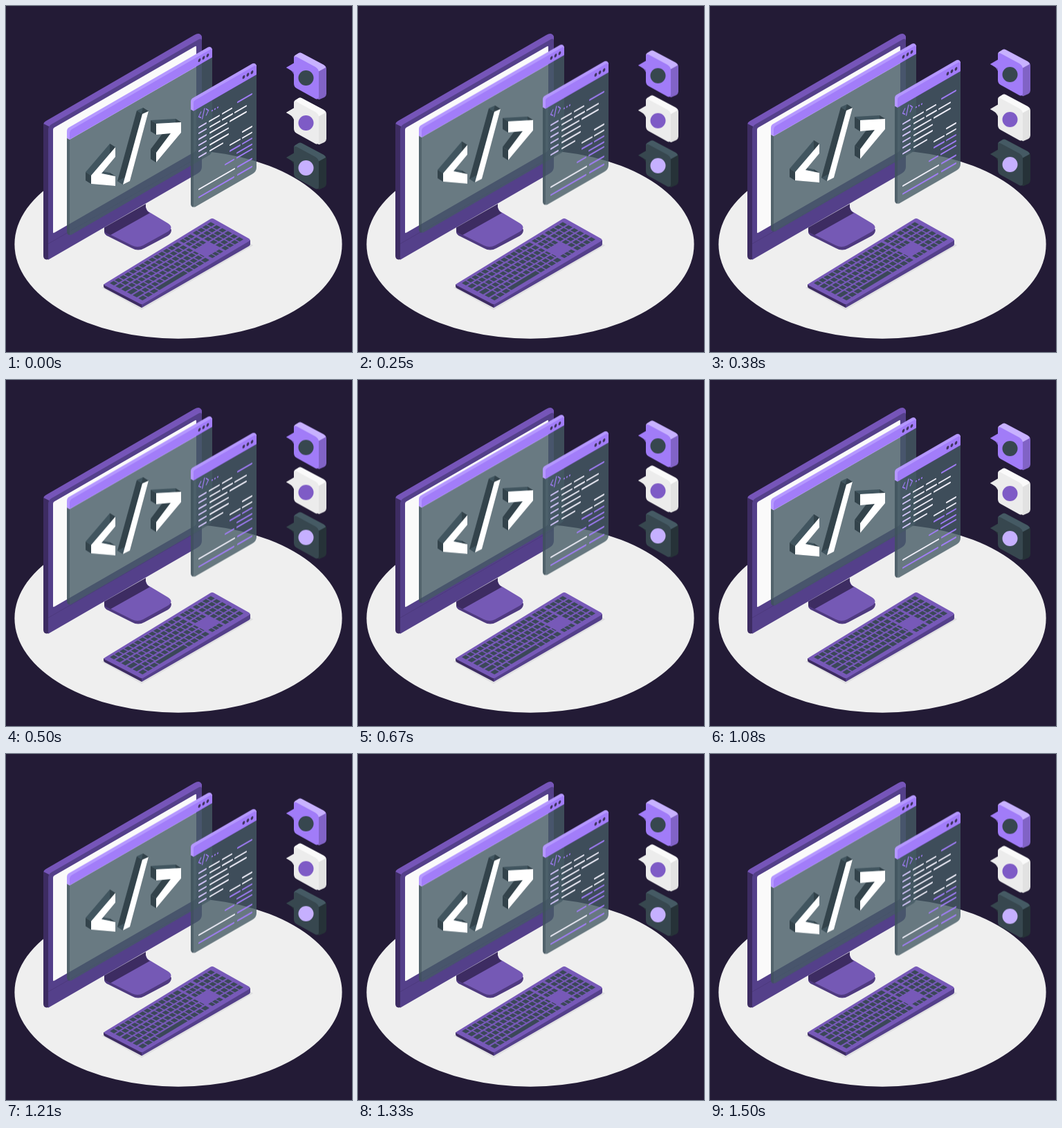
An HTML page that plays this animation: 500x500 px, repeating every 1540 ms.

```html
<!DOCTYPE html>
<html lang="en">
<head>
<meta charset="utf-8">
<title>Isometric workstation</title>
<style>
  html, body { margin: 0; width: 100%; height: 100%; overflow: hidden; background: #231b36; }
  svg { display: block; width: 100vw; height: 100vh; }
  #float { animation: bob 770ms linear -40ms infinite alternate; }
  @keyframes bob {
    from { transform: translateY(.5px); }
    to { transform: translateY(-9.5px); }
  }
</style>
</head>
<body>
<svg viewBox="0 0 500 500">
  <ellipse cx="249" cy="344.4" rx="236.6" ry="136.3" fill="#efefef"/>

  <!-- stand -->
  <path d="M142 321V327Q143 331 148 333L182 350Q191 355 200 350L234 332Q239 329 239 323L208 300Z" fill="#4f3a80"/>
  <path d="M143 321L202 287V291Q203 296 209 299L234 314Q243 320 234 326L198 346Q190 350 182 346L148 329Q142 326 143 321Z" fill="#7559b5"/>
  <path d="M142 320L202 286V291Q203 297 208 299L151 331L147 329Q142 327 142 324Z" fill="#3d2c62"/>

  <!-- monitor -->
  <path d="M54 172Q54 168 58 166L272 42Q280 37 283 44V52L61 178Z" fill="#7655b9"/>
  <path d="M54 170L62 174V366Q54 368 54 361Z" fill="#3d2c62"/>
  <g transform="matrix(1 -.577 0 1 61 173.7)">
    <path d="M0 5Q0 0 5 0H217Q222 0 222 5V187Q222 193 216 193H0Z" fill="#54408a"/>
    <rect x="7" y="7" width="207" height="152" rx="2" fill="#fafafa"/>
    <path d="M0 170H222" stroke="#4a3779" stroke-width=".8"/>
  </g>

  <!-- keyboard -->
  <path d="M138 407L196 439L357 346L350 341Z" fill="#dfdfe1"/>
  <path d="M141 402L196 430V436L143 408Q141 407 141 405Z" fill="#3d2c62"/>
  <path d="M196 430L353 338V344Q353 346 351 347L198 435Q197 436 196 436Z" fill="#54408a"/>
  <path d="M143 401L295 308Q298 306 301 308L351 336Q354 338 351 340L199 430Q196 432 193 430L143 404Q140 403 143 401Z" fill="#7759b8"/>
  <g id="keys" transform="matrix(157 -95 55 29 141 402)" fill="#3b4858"></g>

  <g id="float"></g>
</svg>
<script>
  const $ = id => document.getElementById(id);
  const path = (d, fill, extra = '') => `<path d="${d}" fill="${fill}" ${extra}/>`;
  const poly = (pts, fill) => `<polygon points="${pts.join(' ')}" fill="${fill}"/>`;

  // Keyboard: unit square, x along the length, y along the depth
  const key = (x, row, w = .034) =>
    `<rect x="${x}" y="${.065 + row * .15}" width="${w}" height=".108"/>`;
  function keyboard() {
    let out = '';
    for (let row = 0; row < 6; row++) {
      if (row < 5) {
        const wide = row * .009;
        out += key(.035, row, .034 + wide);
        for (let i = 1; i < 13; i++) out += key(.035 + wide + i * .0445, row);
        out += key(.035 + wide + 13 * .0445, row, .044 - wide);
      } else {
        for (let i = 0; i < 3; i++) out += key(.035 + i * .052, row, .042);
        out += key(.191, row, .26);
        for (let i = 0; i < 4; i++) out += key(.461 + i * .05, row, .04);
      }
      for (let i = 0; i < 3; i++)
        if (row < 3 || row === 5) out += key(.678 + i * .036, row, .028);
      for (let i = 0; i < 4; i++) out += key(.798 + i * .044, row);
    }
    return out;
  }

  // Glass window on the left-facing plane
  function pane(x, y, w, h, bar, inner = '') {
    let dots = '';
    for (let i = 0; i < 3; i++)
      dots += `<ellipse cx="${w - 18.5 + i * 6}" cy="${bar / 2}" rx="1.9" ry="2.4" fill="#40355f"/>`;
    return `<g transform="matrix(1 -.577 0 1 ${x} ${y})">` +
      path(`M0 ${bar}L-4 ${bar - 4.6}V${h - 8}Q-4 ${h - 4} 0 ${h - 1}Z`, '#3f525c', 'opacity=".9"') +
      path(`M0 ${bar}H${w}V${h - 6}q0 6-6 6H3q-3 0-3-3Z`, '#455a64', 'opacity=".8"') +
      path(`M0 ${bar}L-4 ${bar - 4.6}V-1Q-4-5-1-5H${w - 6}Q${w - 2}-4.6 ${w} 1V4H3Z`, '#b598ff') +
      path(`M0 ${bar}V3q0-3 3-3H${w - 4}q4 0 4 4V${bar}Z`, '#a27df9') +
      dots + inner + '</g>';
  }

  // Code lines: row, start, end
  const white = '#f7f5ff', lilac = '#d9caff', violet = '#a27df9';
  const line = (a, b, v, color) =>
    `<path d="M${a} ${v}H${b}" stroke="${color}" stroke-width="2.1" stroke-linecap="round"/>`;
  function code() {
    const step = 8.6, top = 42.5;
    let out = line(64, 84, 38.5, violet);
    for (let i = 0; i < 6; i++) out += line(8, 18, top + i * step, lilac);
    [[0, 23, 37], [0, 42, 55], [1, 24, 38], [1, 42, 56], [1, 60, 76], [2, 24, 48], [2, 53, 76],
     [3, 24, 50], [4, 24, 50], [5, 24, 42], [5, 71, 84], [6, 53, 67], [6, 71, 84]]
      .forEach(([r, a, b]) => out += line(a, b, top + r * step, white));
    [[7, 53, 67], [7, 71, 84], [8, 63, 84], [8.8, 46, 58], [8.8, 63, 84]]
      .forEach(([r, a, b]) => out += line(a, b, top + r * step, violet));
    out += line(8, 59, 132, white) + line(64, 84, 132, violet) +
      line(8, 58, 143.5, violet) + line(64, 84, 143.5, violet);
    out += `<path d="M11 21.5L7.5 27L11 30.5M16 19.5L12.5 33.5M18 21.5L21.5 26L18 31.5" fill="none" stroke="${violet}" stroke-width="1.3"/>`;
    for (let i = 0; i < 3; i++) out += `<circle cx="${27 + i * 4}" cy="29.5" r="1.1" fill="${violet}"/>`;
    return out;
  }

  // White face with an extrusion towards the upper left
  function solid(face) {
    const back = ([x, y]) => [x - 8, y - 5];
    const sides = face.map((p, i) => {
      const q = face[(i + 1) % face.length];
      const flat = Math.abs(q[0] - p[0]) > Math.abs(q[1] - p[1]) * .8;
      return poly([p, q, back(q), back(p)], flat ? '#41555f' : '#33434b');
    });
    return sides.join('') + poly(face, '#fff');
  }

  function badge(y, [front, top, side, mark]) {
    return `<g transform="translate(0 ${y})">` +
      path('M405 89L417 82V101Q413 92 405 89Z', side) +
      path('M405 89L417 82V96Z', front) +
      path('M417 73L423 68Q425 67 427 68L459 85Q463 87 463 91V127Q463 130 460 132L453 135Q450 136 449 130V90Z', side) +
      path('M416 75Q416 72 418 71L423 68Q425 67 427 68L459 85Q462 87 462 89L451 95Z', top) +
      path('M416 76Q416 71 421 74L447 88Q452 91 452 96V131Q452 136 447 134L420 119Q416 117 416 112Z', front) +
      `<circle cx="433.5" cy="104" r="11" fill="${mark}"/></g>`;
  }

  const glyphs = [
    [[123, 245], [158, 204], [158, 218], [138, 242], [158, 246], [158, 260], [123, 257]],
    [[169, 258], [197, 156], [206, 152], [179, 253]],
    [[217, 170], [253, 168], [253, 183], [217, 226], [217, 212], [238, 184], [217, 186]]
  ];
  const badges = [
    ['#a17cf8', '#c8b2ff', '#8163c6', '#37474f'],
    ['#ececec', '#fafafa', '#e2e2e2', '#7e5bc6'],
    ['#37474f', '#455a64', '#263238', '#c6b0ff']
  ];

  $('keys').innerHTML = keyboard();
  $('float').innerHTML =
    pane(92, 180, 206, 152, 13) +
    glyphs.map(solid).join('') +
    pane(271, 137.3, 91, 154.5, 14.5, code()) +
    badges.map((b, i) => badge(i * 65, b)).join('');
</script>
</body>
</html>
```
